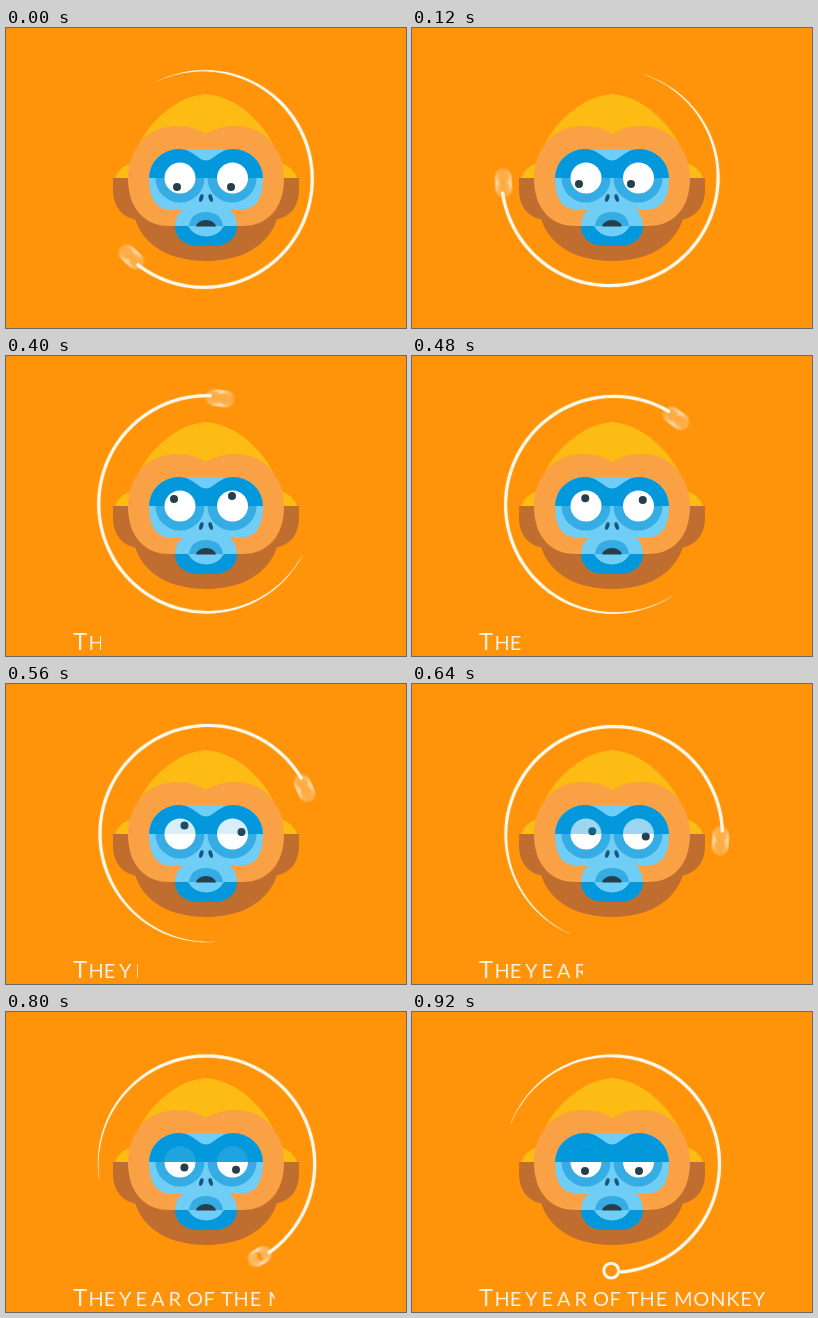
An HTML page with a canvas for the animation above (1120 ms loop, 400 px wide and 300 px high).

```html
<!DOCTYPE html>
<html lang="en">
<head>
<meta charset="utf-8">
<title>The Year of the Monkey</title>
<style>
html, body { margin: 0; width: 100%; height: 100%; overflow: hidden; background: #ff930a; }
canvas { display: block; }
</style>
</head>
<body>
<canvas id="stage" width="400" height="300"></canvas>
<script>
const g = document.getElementById('stage').getContext('2d');
const LOOP = 1120, STEP = 40, LAST = 920, RAD = Math.PI / 180;
const C = {
  bg: '#ff930a', hair: '#fdbc14', skin: '#f9a144', jaw: '#c06e2f', light: '#70cdf5',
  mid: '#35ace4', dark: '#0298db', navy: '#263f4c', white: '#fff', line: '#fff8e8'
};

// Key times and values at those times
const times = [0, 120, 240, 400, 560, 720, 920];
const leftX = [171, 167, 164, 168, 178.5, 182, 173];
const leftY = [159, 156, 152, 143, 141.5, 153, 159];
const rightX = [225, 219, 217, 226, 235.5, 232, 227];
const rightY = [159, 156, 149, 140, 148, 157, 159];
const orbitT = [0, 120, 240, 400, 560, 720, 800, 880, 920];
const orbitA = [133, 177, 220, 277, 334.5, 392, 420, 443, 450];
const textT = [200, 240, 400, 560, 720, 920];
const textX = [64, 75, 95, 132, 210, 356];

function tween(t, ts, vs) {
  if (t <= ts[0]) return vs[0];
  for (let i = 1; i < ts.length; i++) {
    if (t <= ts[i]) return vs[i - 1] + (vs[i] - vs[i - 1]) * (t - ts[i - 1]) / (ts[i] - ts[i - 1]);
  }
  return vs[vs.length - 1];
}

function shape(color, d) {
  g.fillStyle = color;
  g.fill(new Path2D(d));
}

function disc(color, x, y, r, from = 0, to = 360) {
  g.fillStyle = color;
  g.beginPath();
  g.arc(x, y, r, from * RAD, to * RAD);
  g.fill();
}

function mirrored(draw) {
  draw();
  g.save();
  g.translate(400, 0);
  g.scale(-1, 1);
  draw();
  g.restore();
}

function drawHead() {
  mirrored(() => {
    shape(C.hair, 'M109 150.5Q113 138 126 135V150.5Z');
    shape(C.jaw, 'M107 150H134V192C116 191 107 178 107 162Z');
  });
  shape(C.hair, 'M128 130C134 104 164 69 200 66C236 69 266 104 272 130Z');
  shape(C.jaw, 'M127 180H273C270 212 242 233 200 233C158 233 130 212 127 180Z');
  shape(C.skin, 'M200 106C187 98 179 98 168 98C140 99 122 123 122 150C122 180 138 198 164 198'
    + 'H236C262 198 278 180 278 150C278 123 260 99 232 98C221 98 213 98 200 106Z');
  shape(C.light, 'M143 150A30 29 0 0 1 173 121H227A30 29 0 0 1 257 150C257 171 250 182 232 182H224'
    + 'Q231 188 231 198H169Q169 188 176 182H168C150 182 143 171 143 150Z');
  mirrored(() => disc(C.mid, 174, 150, 24.5, 0, 180));
  shape(C.dark, 'M143 150A30 29 0 0 1 173 121C187 121 192 132.5 200 132.5'
    + 'C208 132.5 213 121 227 121A30 29 0 0 1 257 150Z');
  shape(C.dark, 'M169 198H231C231 211 220 218 208 218H192C180 218 169 211 169 198Z');
  shape(C.mid, 'M183 198Q185 184 200 184Q215 184 217 198Z');
  shape(C.light, 'M182 198H218Q212 208.5 200 208.5Q188 208.5 182 198Z');
  shape(C.navy, 'M190 198.5Q192 192 200 192Q208 192 210 198.5Z');
  mirrored(() => {
    g.fillStyle = '#17567f';
    g.beginPath();
    g.ellipse(195.3, 170, 2, 4, 0.3, 0, 7);
    g.fill();
  });
}

function drawEyes(t) {
  const eyes = [[174, leftX, leftY], [226.5, rightX, rightY]];
  for (const [x, px, py] of eyes) {
    disc(C.white, x, 150, 15.5);
    disc(C.navy, tween(t, times, px), tween(t, times, py), 4);
    // The lid fades in over the upper half
    g.globalAlpha = tween(t, [510, 840], [0, 1]);
    disc(C.dark, x, 150, 16, 180, 360);
    g.globalAlpha = 1;
  }
}

function drawOrbit(t) {
  const a = tween(t, orbitT, orbitA);
  const cx = 200 + 2.3 * Math.cos((a + 20) * RAD);
  const cy = 150 + 2.3 * Math.sin((a + 20) * RAD);
  const r = 108.3, tail = a - 249, span = 244.3;
  const width = d => Math.min(3.1, 0.2 + d / 26);
  const point = (d, side) => {
    const rad = r + side * width(d) / 2, b = (tail + d) * RAD;
    g.lineTo(cx + rad * Math.cos(b), cy + rad * Math.sin(b));
  };

  g.save();
  g.shadowColor = 'rgba(255,235,190,.6)';
  g.shadowBlur = 1.5;
  g.fillStyle = C.line;
  g.beginPath();
  for (let d = 0; d < span; d += 2) point(d, 1);
  point(span, 1);
  for (let d = span; d > 0; d -= 2) point(d, -1);
  g.fill();
  g.restore();

  // Loop at the tip, smeared along its direction of travel
  const blur = tween(t, [720, 880, 920], [6.5, 2.5, 0]);
  const copies = blur ? 13 : 1;
  g.save();
  g.translate(cx + (r - 1.8) * Math.cos(a * RAD), cy + (r - 1.8) * Math.sin(a * RAD));
  g.rotate((a + 90) * RAD);
  g.strokeStyle = C.line;
  g.lineWidth = 3;
  g.globalAlpha = blur ? 0.11 : 1;
  for (let i = 0; i < copies; i++) {
    g.beginPath();
    g.arc(blur * (i / 6 - 1), 0, 7.4, 0, 7);
    g.stroke();
  }
  g.restore();
}

function drawTitle(t) {
  if (t <= 200) return;
  g.save();
  g.beginPath();
  g.rect(60, 270, tween(t, textT, textX) - 60, 30);
  g.clip();
  g.fillStyle = '#f8efe0';
  const write = (s, x, size, gap) => {
    g.font = `${size}px Lato, sans-serif`;
    g.letterSpacing = gap + 'px';
    g.fillText(s, x, 294);
  };
  write('T', 67, 24, 0);
  write('HE', 82.5, 20, 0);
  write('YEAR', 113, 20, 4);
  write('OF', 181, 20, 0.5);
  write('THE', 215, 20, 0.8);
  write('MONKEY', 262, 20, 0.8);
  g.restore();
}

function frame(now) {
  const t = Math.min(LAST, Math.floor(now % LOOP / STEP) * STEP);
  g.fillStyle = C.bg;
  g.fillRect(0, 0, 400, 300);
  drawHead();
  drawEyes(t);
  drawOrbit(t);
  drawTitle(t);
}

let begin;
function tick(now) {
  begin ??= now;
  frame(now - begin);
  requestAnimationFrame(tick);
}
frame(0);
requestAnimationFrame(tick);
</script>
</body>
</html>
```
